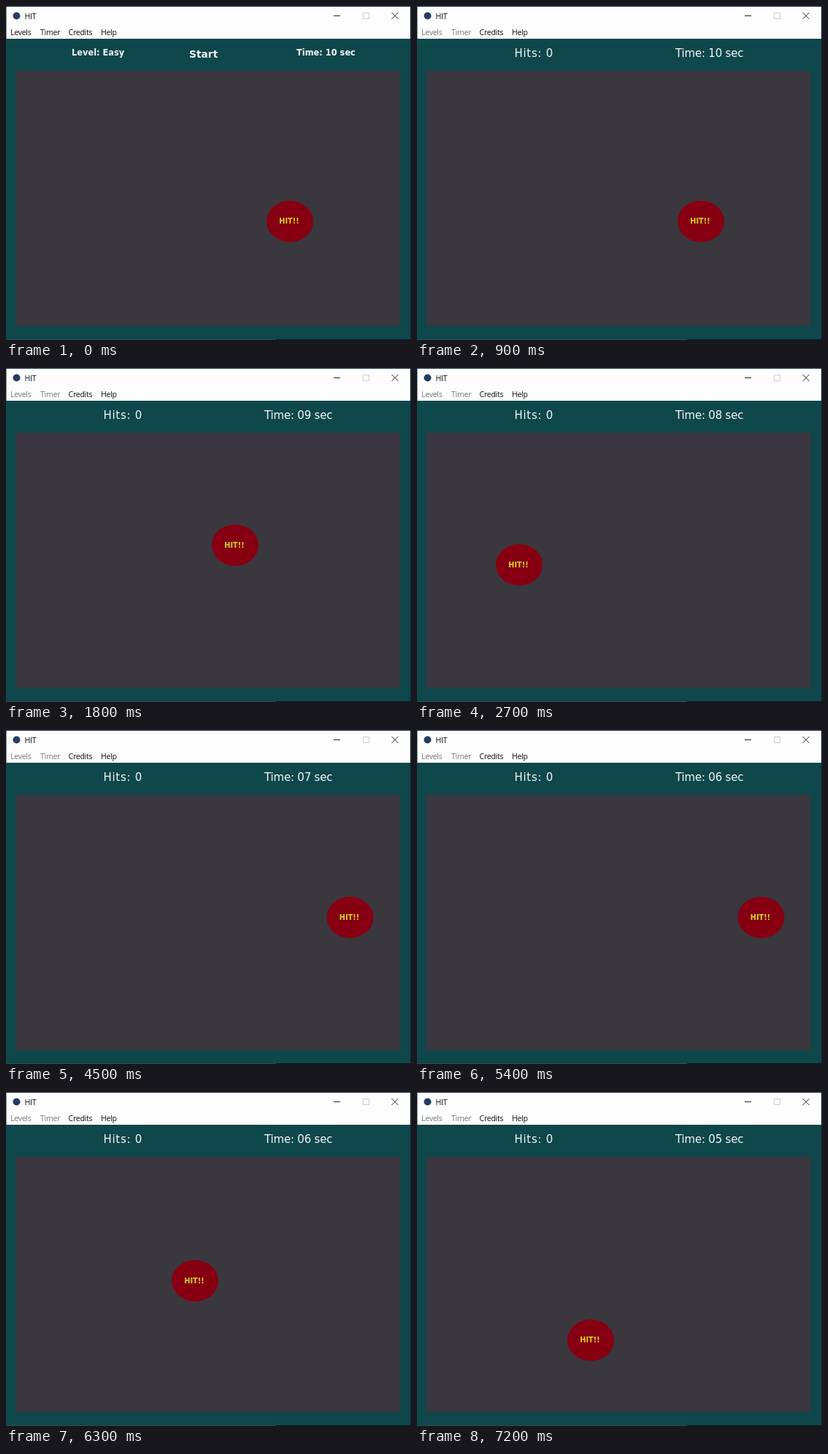
Animation, 555 px wide and 459 px high, one loop 8000 ms. Source, as an HTML page:

```html
<!DOCTYPE html>
<html lang="en">
<head>
<meta charset="utf-8">
<title>HIT</title>
<style>
  html, body { margin: 0; width: 100%; height: 100%; overflow: hidden; background: #0e474c; }
  svg { display: block; width: 555px; height: 459px; }
  text { font-family: "DejaVu Sans", sans-serif; fill: #f4f6f6; }
  .ui text { font: 10.6px "Open Sans", sans-serif; letter-spacing: -.28px; fill: #111; }
  .ready text { font-size: 11.4px; font-weight: bold; }
  .ready .start { font-size: 13.8px; }
  .play text { font-size: 15px; }
  .ball text { font-size: 9.8px; font-weight: bold; fill: #d3d22e; }
  .playing .ready, .play { display: none; }
  .playing .play { display: inline; }
  .playing .ui .lock { fill: #777; }
</style>
</head>
<body>
<svg id="stage" viewBox="0 0 555 459">
  <rect width="555" height="459" fill="#0e474c"/>
  <rect width="555" height="45" fill="#fdfdfd"/>
  <rect width="555" height="1" fill="#1d2b58"/>
  <rect y="1" width="1" height="44" fill="#8d98a8"/>
  <rect x="554" width="1" height="459" fill="#0b2340"/>
  <rect y="458" width="370" height="1" fill="#38484c"/>
  <rect x="370" y="458" width="185" height="1" fill="#10151f"/>
  <rect x="13" y="89" width="527" height="351" fill="#3b373f"/>

  <g class="ui">
    <circle cx="14.5" cy="13.5" r="5" fill="#263c63"/>
    <text x="25.5" y="18">HIT</text>
    <text class="lock" x="6" y="40">Levels</text>
    <text class="lock" x="47" y="40">Timer</text>
    <text x="85.5" y="40">Credits</text>
    <text x="130" y="40">Help</text>
    <g fill="none" stroke="#222">
      <path d="M449 13.5h9"/>
      <path d="M489.5 9.5h8v8h-8z" stroke="#ccc"/>
      <path d="M528.5 9l9 9m0-9l-9 9"/>
    </g>
  </g>

  <g class="ready">
    <text x="90" y="68">Level: Easy</text>
    <text class="start" x="251" y="71">Start</text>
    <text x="398" y="68">Time: 10 sec</text>
  </g>
  <g class="play">
    <text x="133.5" y="70" letter-spacing=".7">Hits: 0</text>
    <text id="time" x="354" y="70" letter-spacing="-.2"></text>
  </g>

  <g class="ball" id="ball">
    <ellipse rx="32" ry="28.5" fill="#870012"/>
    <text x="-1" y="3" text-anchor="middle">HIT!!</text>
  </g>
</svg>
<script>
  const LOOP = 8000, STEP = 900;
  // ball x, ball y, seconds left
  const poses = [
    [389, 296, 10], [389, 296, 10], [314, 243.5, 9],
    [140, 270.5, 8], [187, 217, 8], [471.5, 257.5, 7],
    [471.5, 257.5, 6], [259, 259.5, 6], [238, 341, 5]
  ];
  const get = id => document.getElementById(id);
  const stage = get("stage"), ball = get("ball"), time = get("time");

  function draw() {
    const i = Math.floor(performance.now() % LOOP / STEP);
    const [x, y, left] = poses[i];
    stage.classList.toggle("playing", i > 0);
    ball.setAttribute("transform", `translate(${x} ${y})`);
    time.textContent = `Time: ${String(left).padStart(2, "0")} sec`;
    requestAnimationFrame(draw);
  }
  draw();
</script>
</body>
</html>
```
